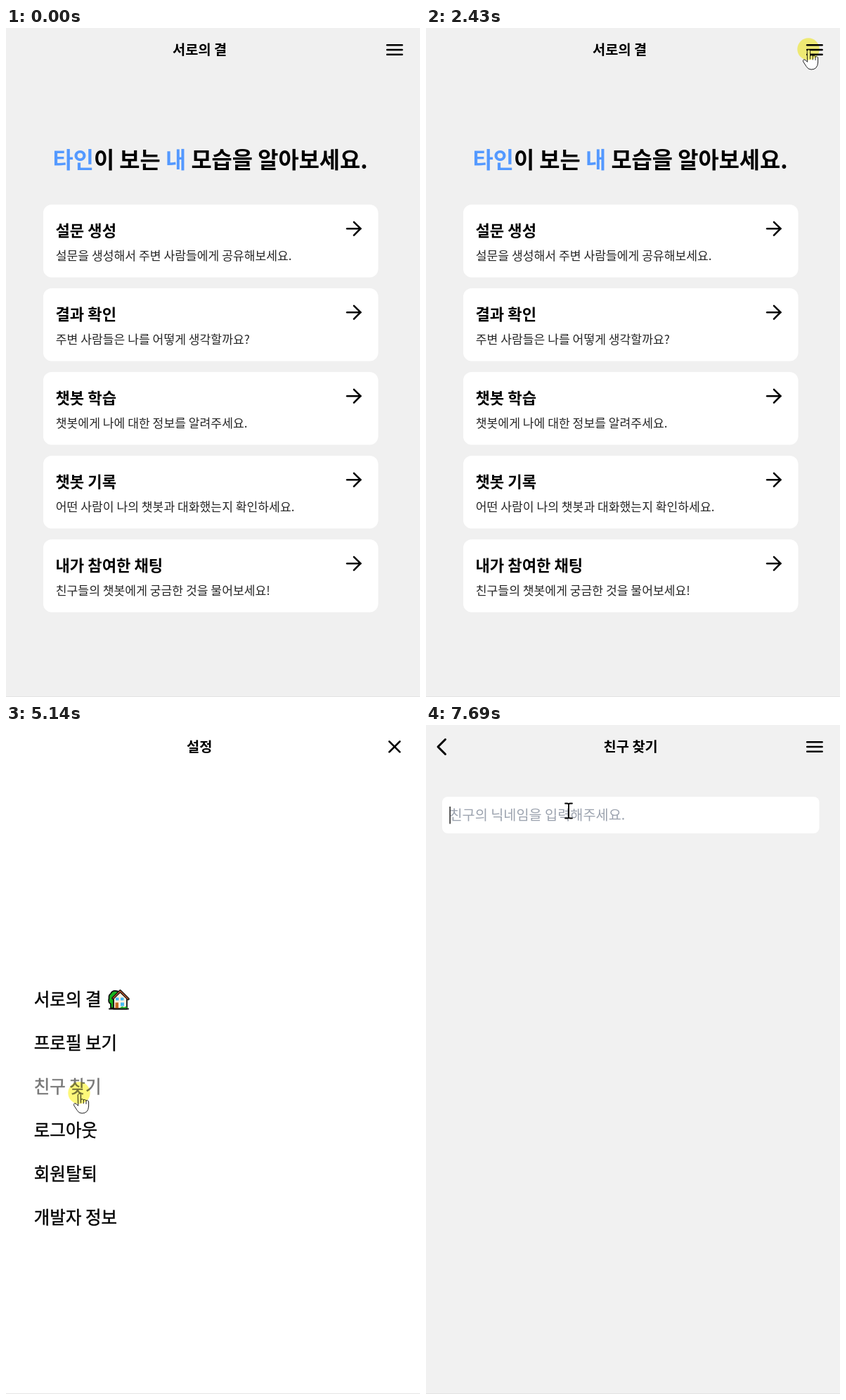
An HTML page with a canvas that plays this animation: 589x951 px, repeating every 8000 ms.

```html
<!DOCTYPE html>
<html lang="ko">
<head>
<meta charset="utf-8">
<title>서로의 결</title>
<style>
  html, body { margin: 0; width: 100%; height: 100%; overflow: hidden; background: #f0f0f0; }
  canvas { display: block; }
</style>
</head>
<body>
<canvas id="stage" width="589" height="951"></canvas>
<script>
const ctx = document.getElementById('stage').getContext('2d');
const LOOP = 8000, STEP = 70;
const MENU_AT = 2500, SEARCH_AT = 5270, FOCUS_AT = 7620;
const APP = '서로의 결';
const FONT = '"Noto Sans CJK KR", "Noto Sans KR", "Noto Sans CJK", sans-serif';
const BLACK = '#000', SOFT = '#262626', HOVER = '#777', BLUE = '#5499ff';

const CARDS = [
  ['설문 생성', '설문을 생성해서 주변 사람들에게 공유해보세요.'],
  ['결과 확인', '주변 사람들은 나를 어떻게 생각할까요?'],
  ['챗봇 학습', '챗봇에게 나에 대한 정보를 알려주세요.'],
  ['챗봇 기록', '어떤 사람이 나의 챗봇과 대화했는지 확인하세요.'],
  ['내가 참여한 채팅', '친구들의 챗봇에게 궁금한 것을 물어보세요!']
];
const MENU = [APP, '프로필 보기', '친구 찾기', '로그아웃', '회원탈퇴', '개발자 정보'];

// Pointer path: [time, x, y]
const PATH = [
  [330, 461, 346], [540, 413, 205], [680, 434, 105], [820, 476, 64],
  [1100, 524, 24], [1440, 544, 30], [2630, 544, 30], [2980, 285, 158],
  [3190, 166, 369], [3470, 125, 458], [3680, 104, 523], [5460, 104, 523],
  [5530, 105, 518], [5660, 105, 518], [6150, 201, 117], [6350, 201, 120],
  [6550, 201, 120], [6690, 203, 122]
];
// Presses of the mouse button: [from, to]
const PRESSES = [[2430, 2500], [5140, 5270], [7620, 7690]];

function pointerAt(t) {
  if (t < PATH[0][0]) return null;
  const next = PATH.findIndex(p => p[0] > t);
  if (next < 0) {
    const [, x, y] = PATH[PATH.length - 1];
    return { x, y };
  }
  const [t0, x0, y0] = PATH[next - 1], [t1, x1, y1] = PATH[next];
  const k = Math.floor((t - t0) / STEP) * STEP / (t1 - t0);
  return { x: x0 + (x1 - x0) * k, y: y0 + (y1 - y0) * k };
}

// The optional outline gives a medium weight.
function text(str, x, y, size, weight = 400, color = BLACK, outline = 0) {
  ctx.font = `${weight} ${size}px ${FONT}`;
  ctx.fillStyle = ctx.strokeStyle = color;
  ctx.fillText(str, x, y);
  if (outline) {
    ctx.lineWidth = outline;
    ctx.lineJoin = 'round';
    ctx.strokeText(str, x, y);
  }
  return x + ctx.measureText(str).width;
}

function line(points, width, color = BLACK) {
  ctx.beginPath();
  points.forEach(([x, y]) => ctx.lineTo(x, y));
  ctx.lineWidth = width;
  ctx.strokeStyle = color;
  ctx.lineCap = ctx.lineJoin = 'round';
  ctx.stroke();
}

function panel(x, y, w, h, r) {
  ctx.beginPath();
  ctx.roundRect(x, y, w, h, r);
  ctx.fillStyle = '#fff';
  ctx.fill();
}

function background(color, edge) {
  ctx.fillStyle = color;
  ctx.fillRect(0, 0, 589, 951);
  ctx.fillStyle = edge;
  ctx.fillRect(0, 950, 589, 1);
}

function hamburger() {
  for (const y of [24.3, 31, 37.7]) line([[542.2, y], [563.6, y]], 2.5);
}

function arrow(y, color) {
  line([[485.2, y], [504.4, y]], 2.6, color);
  line([[495, y - 9.4], [504.4, y], [495, y + 9.4]], 2.6, color);
}

function home(pointer) {
  background('#f0f0f0', '#e3e3e3');
  text(APP, 237, 38, 19.8, 700);
  hamburger();
  const runs = [['타인', BLUE], ['이 보는 ', BLACK], ['내', BLUE], [' 모습을 알아보세요.', BLACK]];
  runs.reduce((x, [str, color]) => text(str, x, 199, 31.75, 700, color), 66.5);
  CARDS.forEach(([title, note], i) => {
    const top = 251 + i * 119;
    const hover = overCard(pointer, top);
    panel(53, top, 476.5, 103.5, 12);
    text(title, 70.5, top + 45, 22.15, 700, hover ? HOVER : BLACK);
    text(note, 70.8, top + 78.5, 17.17, 300, hover ? HOVER : SOFT);
    arrow(top + 34.2, hover ? HOVER : BLACK);
  });
}

function overCard(p, top) {
  return p && p.x > 53 && p.x < 529 && p.y > top && p.y < top + 103;
}

function overItem(p, i) {
  return p && p.x > 38 && p.x < 178 && Math.abs(p.y - 390 - 62 * i) < 19;
}

function shape(d, fill, stroke, width = 1) {
  const path = new Path2D(d);
  if (fill) {
    ctx.fillStyle = fill;
    ctx.fill(path);
  }
  if (stroke) {
    ctx.lineWidth = width;
    ctx.lineJoin = ctx.lineCap = 'round';
    ctx.strokeStyle = stroke;
    ctx.stroke(path);
  }
}

function at(x, y, draw) {
  ctx.save();
  ctx.translate(x, y);
  draw();
  ctx.restore();
}

function house() {
  shape('M4 27V21Q0 19 1.5 13Q1 8 4 6.5Q6 2 11 2.5Q15 2.5 16 6L14 27Z', '#16b51d', '#111', 1.8);
  shape('M8 28V13L17.5 4L27 13V28Z', '#fff0df', '#111', 1.8);
  shape('M7 13L17.5 2.5L29 14', null, '#111', 3.6);
  shape('M7.5 12.7L17.5 2.8L28.5 13.7', null, '#b9562e', 1.5);
  shape('M10.5 19H15V28H10.5Z', '#c66a24');
  shape('M11 12H15.5V16H11ZM18 12H22.5V16H18ZM18 19H23V24H18Z', '#45bdf5');
  shape('M2 28H29', null, '#111', 2);
  shape('M17 27Q20 23 23 26Q26 23 28 27Z', '#16b51d');
}

function menu(pointer) {
  background('#fff', '#e6e6e6');
  text('설정', 257, 38, 19.8, 700);
  line([[545.3, 23.4], [560.3, 38.4]], 2.7);
  line([[560.3, 23.4], [545.3, 38.4]], 2.7);
  MENU.forEach((label, i) =>
    text(label, 39.8, 398.6 + 62 * i, 24.5, 400, overItem(pointer, i) ? HOVER : BLACK, 0.45));
  at(145, 375.5, house);
}

function search(focused) {
  background('#f1f1f1', '#e3e3e3');
  line([[27.5, 20.5], [17, 31], [27.5, 41.5]], 3);
  text('친구 찾기', 252.5, 38, 19.8, 700);
  hamburger();
  panel(23, 102, 536.5, 52, 8);
  text('친구의 닉네임을 입력해주세요.', 33.5, 135, 19.7, 400, '#9ca3af');
  if (focused) {
    ctx.fillStyle = BLACK;
    ctx.fillRect(33.5, 116, 1.3, 24.5);
  }
}

function arrowCursor() {
  shape('M.5.5V21.5L5.2 17.4L8.8 24.4L12 23L8.8 16H15.7Z', '#fff', '#222');
}

function handCursor() {
  shape('M-1.6 2.5Q.5-1 2.5 2.5V9.5Q5 7.6 6.3 10Q8.8 8.5 10 11Q13.4 9.8 13.6 13V19' +
    'Q13 29 4 29Q-.5 29-3 24.5L-7.2 18Q-8.4 14.5-5 15L-1.6 18Z', '#fff', '#222');
  shape('M2.5 9V14M6.3 10V15M10 11V15.5', null, '#222');
}

function beamCursor() {
  shape('M-5-10.5H-2Q0-10.5 0-9Q0-10.5 2-10.5H5M0-9V9M-5 10.5H-2Q0 10.5 0 9Q0 10.5 2 10.5H5',
    null, '#000', 1.8);
}

function cursorFor(t, p) {
  if (t >= SEARCH_AT) {
    if (t < SEARCH_AT + 60) return handCursor;
    return p.y < 154 ? beamCursor : arrowCursor;
  }
  if (p.x > 530 && p.y < 50) return handCursor;
  const active = t < MENU_AT
    ? CARDS.some((_, i) => overCard(p, 251 + i * 119))
    : MENU.some((_, i) => overItem(p, i));
  return active ? handCursor : arrowCursor;
}

function halo(x, y) {
  ctx.save();
  ctx.globalCompositeOperation = 'multiply';
  ctx.fillStyle = '#fdf87a';
  ctx.beginPath();
  ctx.arc(x, y, 15.7, 0, Math.PI * 2);
  ctx.fill();
  ctx.restore();
}

function render(t) {
  const pointer = pointerAt(t);
  if (t < MENU_AT) home(pointer);
  else if (t < SEARCH_AT) menu(pointer);
  else search(t >= FOCUS_AT);
  if (!pointer) return;
  at(pointer.x, pointer.y, cursorFor(t, pointer));
  if (PRESSES.some(([from, to]) => t >= from && t < to)) halo(pointer.x, pointer.y);
}

const start = performance.now();
function tick() {
  render((performance.now() - start) % LOOP);
  requestAnimationFrame(tick);
}
tick();
</script>
</body>
</html>
```
